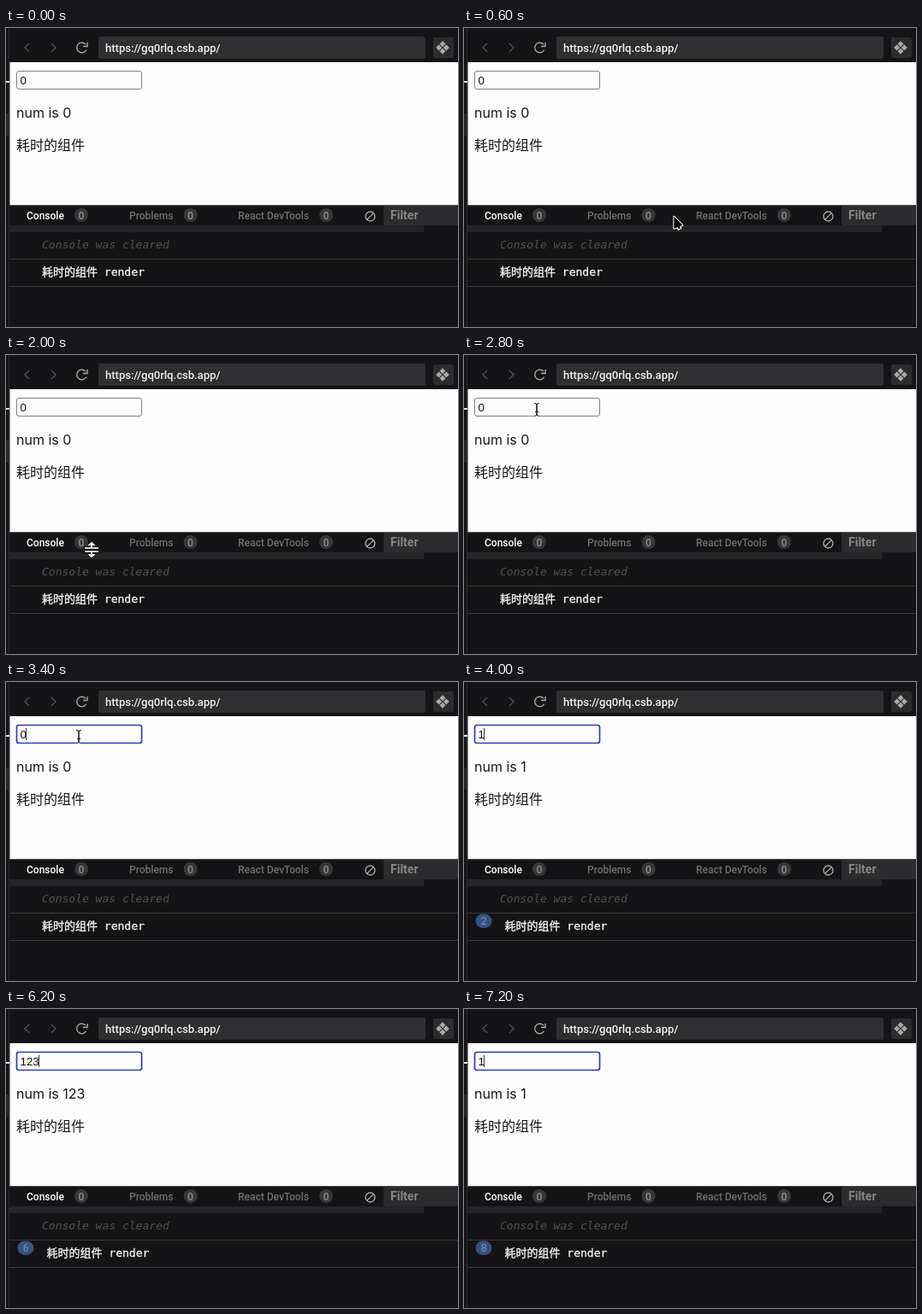
Recreate the animation shown at these times as an HTML page with a canvas. Size 528 by 350 pixels, loop 7.4 s.

```html
<!DOCTYPE html>
<html lang="zh-CN">
<head>
<meta charset="utf-8">
<style>
html, body { margin: 0; width: 100%; height: 100%; overflow: hidden; background: #141416; }
canvas { display: block; }
</style>
</head>
<body>
<canvas id="stage" width="528" height="350"></canvas>
<script>
const ctx = document.getElementById('stage').getContext('2d');
const LOOP = 7400, STEP = 200;
const UI = 'Roboto, sans-serif';
const PAGE = 'Inter, "Noto Sans CJK SC", sans-serif';
const MONO = '"DejaVu Sans Mono", "Noto Sans CJK SC", monospace';

const FOCUS_AT = 3400, TYPE_AT = 3800, KEY_GAP = 500;
const WORD = '1234', LAST_KEY = 7;

// Places the pointer rests at, with arrival and departure times.
const stops = [
  { x: 300, y: 290, from: 400, to: 400 },
  { x: 89, y: 23, from: 1000, to: 1400 },
  { x: 100, y: 228, from: 2000, to: 2200 },
  { x: 85, y: 64, from: 2800, to: TYPE_AT },
];

const ease = p => p * p * (3 - 2 * p);
const mix = (a, b, p) => a + (b - a) * p;

function pointerAt(t) {
  const next = stops.findIndex(s => t < s.to);
  if (next < 0 || t < stops[0].from) return null;
  const b = stops[next], a = stops[Math.max(0, next - 1)];
  const p = t >= b.from ? 1 : ease((t - a.to) / (b.from - a.to));
  return { x: mix(a.x, b.x, p), y: mix(a.y, b.y, p) };
}

function cursorFor({ x, y }) {
  if (y < 36 && x < 100) return hand;
  if (y > 50 && y < 72 && x < 159) return ibeam;
  return Math.abs(y - 228) < 4 ? resize : arrow;
}

// Types WORD one key at a time, then deletes it again; each key renders once.
function inputAt(t) {
  const keys = Math.min(LAST_KEY, Math.max(0, Math.floor((t - TYPE_AT) / KEY_GAP) + 1));
  const length = Math.min(keys, 2 * WORD.length - keys);
  return { value: WORD.slice(0, length) || '0', renders: keys + 1 };
}

function rect(x, y, w, h, color, r = 0) {
  ctx.fillStyle = color;
  ctx.beginPath();
  ctx.roundRect(x, y, w, h, r);
  ctx.fill();
}

function text(s, x, y, font, color, align = 'left') {
  ctx.font = font;
  ctx.fillStyle = color;
  ctx.textAlign = align;
  ctx.fillText(s, x, y);
}

function line(points, color, width = 1) {
  ctx.strokeStyle = color;
  ctx.lineWidth = width;
  ctx.beginPath();
  points.forEach(([x, y]) => ctx.lineTo(x, y));
  ctx.stroke();
}

function ring(x, y, r, from, to, color, width) {
  ctx.strokeStyle = color;
  ctx.lineWidth = width;
  ctx.beginPath();
  ctx.arc(x, y, r, from, to);
  ctx.stroke();
}

function shape(points, fill, outline) {
  ctx.beginPath();
  points.forEach(([x, y]) => ctx.lineTo(x, y));
  ctx.closePath();
  if (outline) {
    ctx.strokeStyle = outline;
    ctx.lineWidth = 2;
    ctx.lineJoin = 'round';
    ctx.stroke();
  }
  ctx.fillStyle = fill;
  ctx.fill();
}

function diamond(x, y, r, color) {
  shape([[x, y - r], [x + r, y], [x, y + r], [x - r, y]], color);
}

function arrow() {
  line([[4, 9], [7, 15]], '#fff', 5);
  shape([[0, 0], [0, 14], [10, 10]], '#000', '#fff');
  line([[4, 9], [6.5, 14]], '#000', 2.5);
}

function hand() {
  for (const [grow, color] of [[1, '#111'], [0, '#fff']]) {
    const part = (x, y, w, h) => rect(x - grow, y - grow, w + 2 * grow, h + 2 * grow, color, 2);
    part(-1, 1, 2.5, 12);
    part(-1, 6, 9, 10);
    part(-4, 8, 5, 3.5);
  }
  for (let x = 2; x < 7; x += 2.3) line([[x, 10], [x, 13]], '#333', 0.8);
}

function resize() {
  for (const [grow, color] of [[1, '#111'], [0, '#fff']]) {
    for (const s of [-1, 1]) {
      rect(-8 - grow, s * 2 - 0.8 - grow, 16 + 2 * grow, 1.6 + 2 * grow, color);
      rect(-1 - grow, Math.min(0, s * 6) + s * 2, 2 + 2 * grow, 6, color);
      const tip = s * (9.5 + grow), base = s * (5 - grow), half = 4.5 + grow;
      shape([[0, tip], [half, base], [-half, base]], color);
    }
  }
}

function ibeam() {
  for (const [color, width] of [['#fff', 3], ['#222', 1.2]]) {
    for (const s of [-1, 1]) {
      line([[s * 3, -7.5], [s, -7], [0, -5.5], [0, 5.5], [s, 7], [s * 3, 7.5]], color, width);
    }
  }
  line([[-2, 2.5], [2, 2.5]], '#222');
}

function chevron(x, dir) {
  line([[x - dir * 2.7, 18], [x + dir * 2.7, 23], [x - dir * 2.7, 28]], '#515153', 1.2);
}

function toolbar() {
  rect(108, 10, 382, 26, '#2f2f31', 2);
  chevron(24.5, -1);
  chevron(55.5, 1);
  ring(88.5, 23, 5.8, 0.5, 5.6, '#a8a8a8', 1.4);
  line([[95, 17], [95, 21.5], [90, 21.5]], '#a8a8a8', 1.4);
  text('https://gq0rlq.csb.app/', 116, 27.5, '500 13px ' + UI, '#f0f0f0');
  rect(499, 11, 24, 24, '#2c2c2e', 2);
  for (let i = 0; i < 4; i++) {
    const a = i * Math.PI / 2;
    diamond(510 + 4.3 * Math.cos(a), 23 + 4.3 * Math.sin(a), 3.5, '#a9a9a9');
  }
}

function inputBox(value, focused) {
  ctx.strokeStyle = focused ? '#2a3fb8' : '#808080';
  ctx.lineWidth = focused ? 1.7 : 1;
  ctx.beginPath();
  ctx.roundRect(12.5, 50.5, 146, 21, 2.5);
  ctx.stroke();
  text(value, 16.5, 65.5, '13.333px "Liberation Sans", Arial, sans-serif', '#111');
  if (focused) {
    rect(Math.round(16 + ctx.measureText(value).width), 54, 1, 14, '#333');
  }
}

function page(value, focused) {
  rect(4.5, 40, 523.5, 167, '#fefefe');
  rect(4, 207, 524, 1, '#555');
  inputBox(value, focused);
  text('num is ' + value, 12, 105, '16px ' + PAGE, '#161616');
  text('耗时的组件', 12, 143, '16px ' + PAGE, '#161616');
}

function tab(label, x, badgeX, color) {
  text(label, x, 223.5, '500 12px ' + UI, color);
  rect(badgeX - 8, 211, 16, 16, '#38383a', 8);
  text('0', badgeX, 223.5, '500 12px ' + UI, '#8c8c8c', 'center');
}

function consolePanel(renders) {
  rect(4, 231, 484, 8, '#252527');
  tab('Console', 24, 88, '#fff');
  tab('Problems', 144, 215.5, '#6e6e6e');
  tab('React DevTools', 271, 374, '#6e6e6e');
  ring(425.5, 220.5, 5.5, 0, Math.PI * 2, '#b0b0b0', 1.3);
  line([[421.6, 224.4], [429.4, 216.6]], '#b0b0b0', 1.3);
  rect(441, 208, 87, 23, '#2c2c2e', 2);
  text('Filter', 449, 224, 'bold 14px ' + UI, '#858585');
  text('Console was cleared', 42, 258, 'italic 13px ' + MONO, '#505050');
  for (const y of [270, 302]) rect(4, y, 524, 1, '#3a3a39');

  const repeated = renders > 1;
  const x = repeated ? 47.5 : 42;
  text('耗时的组件 render', x, 290, '13px ' + MONO, '#f2f2f2');
  ctx.strokeStyle = '#f2f2f2';
  ctx.lineWidth = 0.35;
  ctx.strokeText('耗时的组件 render', x, 290);
  if (repeated) {
    rect(13.5, 271.5, 19, 16.5, '#38517f', 8.2);
    text(renders, 23, 284, '12px ' + UI, '#7690bd', 'center');
  }
}

function draw(t) {
  const { value, renders } = inputAt(t);
  const pointer = pointerAt(t);
  rect(0, 0, 528, 350, '#141416');
  rect(3, 0, 1, 350, '#2b2b2c');
  rect(0, 100, 3, 26, '#262627');
  rect(0, 62, 4, 2, '#e8e8e8');
  toolbar();
  page(value, t >= FOCUS_AT);
  consolePanel(renders);
  if (pointer) {
    ctx.save();
    ctx.translate(pointer.x, pointer.y);
    cursorFor(pointer)();
    ctx.restore();
  }
}

const start = performance.now();
function tick() {
  const t = (performance.now() - start) % LOOP;
  draw(Math.floor(t / STEP) * STEP);
  requestAnimationFrame(tick);
}
tick();
</script>
</body>
</html>
```
